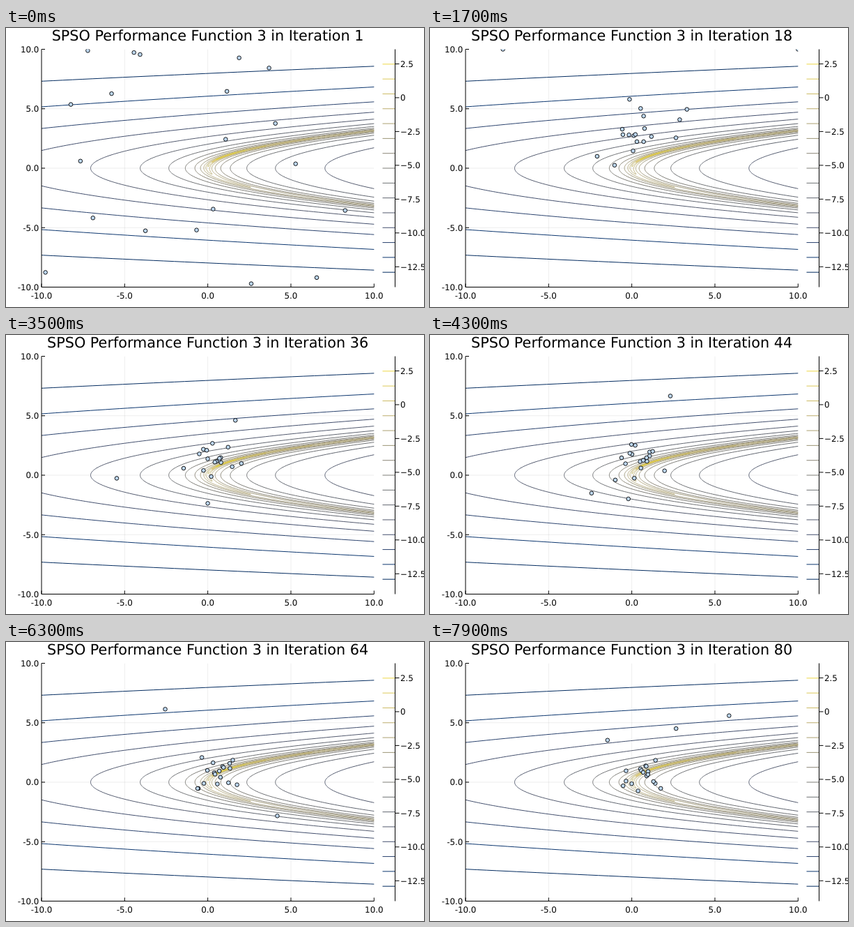
These frames come from a looping animation (600 by 400 pixels, 8000 ms). An HTML page:

```html
<!DOCTYPE html>
<html lang="en">
<head>
<meta charset="utf-8">
<title>Swarm performance</title>
<style>
  html, body { margin: 0; width: 100%; height: 100%; overflow: hidden; background: #fff; }
  svg { display: block; width: 600px; height: 400px; }
  text { font: 11.85px "DejaVu Sans", sans-serif; text-rendering: geometricPrecision; }
  #title { font-size: 20.75px; text-anchor: middle; }
  path { fill: none; stroke-width: 1; }
  .grid { stroke: #000; stroke-opacity: .07; }
  .axis { stroke: #000; }
  .dot { fill: #bdd7f1; stroke: #000; stroke-width: .9; }
</style>
</head>
<body>
<svg viewBox="0 0 600 400">
  <defs><clipPath id="area"><rect x="51" y="30.5" width="477.3" height="341"/></clipPath></defs>
  <g id="field" clip-path="url(#area)"></g>
  <g id="dots" clip-path="url(#area)"></g>
  <g id="axes"></g>
  <text id="title" x="289.6" y="18"></text>
</svg>
<script>
const LEFT = 51, RIGHT = 528.3, TOP = 30.5, BOTTOM = 371.5, BAR = 558.5;
const STEP_MS = 100, STEPS = 80, COUNT = 20;
const LEVELS = 15, LOW = -14.006, HIGH = 3.58;

const mix = (a, b, u) => a + (b - a) * u;
const clamp = v => Math.max(-10, Math.min(10, v));
const px = x => mix(LEFT, RIGHT, (x + 10) / 20);
const py = y => mix(BOTTOM, TOP, (y + 10) / 20);
const barY = v => mix(BOTTOM, TOP, (v - LOW) / (HIGH - LOW));
const layer = id => document.getElementById(id);

function add(parent, tag, attrs, text = "") {
  const el = document.createElementNS("http://www.w3.org/2000/svg", tag);
  for (const key in attrs) el.setAttribute(key, attrs[key]);
  el.textContent = text;
  return parent.appendChild(el);
}

// Colour ramp from navy over grey to yellow.
const RAMP = ["00204c", "05336e", "3b496c", "575d6d", "707173",
              "8a8678", "a59c74", "c3b369", "e1cc55", "fee838"]
  .map(h => [0, 2, 4].map(n => parseInt(h.slice(n, n + 2), 16)));

function colour(v) {
  const t = (v - LOW) / (HIGH - LOW) * (RAMP.length - 1);
  const n = Math.min(Math.floor(t), RAMP.length - 2);
  return `rgb(${RAMP[n].map((c, k) => Math.round(mix(c, RAMP[n + 1][k], t - n)))})`;
}

// Level set of -log(100 (x - y^2)^2 + (1 - y)^2): a circle of radius r
// in the coordinates 10 (x - y^2) and y - 1, kept to the visible rows.
function contour(v) {
  const r = Math.exp(-v / 2), samples = 500;
  const from = Math.asin(Math.max(-1, -11 / r));
  const to = Math.asin(Math.min(1, 9 / r));
  const points = [];
  for (const side of [1, -1]) {
    for (let k = 0; k <= samples; k++) {
      const u = k / samples;
      const angle = side > 0 ? mix(from, to, u) : mix(to, from, u);
      const y = 1 + r * Math.sin(angle);
      const x = y * y + side * r * Math.cos(angle) / 10;
      points.push(px(x).toFixed(2) + " " + py(y).toFixed(2));
    }
  }
  return "M" + points.join("L") + "Z";
}

function drawField() {
  const field = layer("field");
  for (const v of [-5, 0, 5]) {
    add(field, "path", { class: "grid", d: `M${px(v)} ${TOP}V${BOTTOM}M${LEFT} ${py(v)}H${RIGHT}` });
  }
  for (let k = 1; k <= LEVELS; k++) {
    const v = mix(LOW, HIGH, k / (LEVELS + 1));
    const stroke = colour(v);
    add(field, "path", { stroke, d: contour(v) });
    add(layer("axes"), "path", { stroke, d: `M540.5 ${barY(v)}H${BAR}` });
  }
}

function drawAxes() {
  const axes = layer("axes");
  let d = `M${LEFT} ${TOP}V${BOTTOM}H${RIGHT}M${BAR} ${TOP}V${BOTTOM}`;
  for (let v = -10; v <= 10; v += 5) {
    const label = v.toFixed(1);
    d += `M${px(v)} ${BOTTOM}v-5M${LEFT} ${py(v)}h5`;
    add(axes, "text", { x: px(v), y: 388, "text-anchor": "middle" }, label);
    add(axes, "text", { x: 47.3, y: py(v) + 4.3, "text-anchor": "end" }, label);
  }
  for (let v = 2.5; v >= -12.5; v -= 2.5) {
    d += `M${BAR} ${barY(v)}h6`;
    const label = v ? v.toFixed(1).replace("-", "\u2212") : "0";
    add(axes, "text", { x: 566, y: barY(v) + 4.3 }, label);
  }
  add(axes, "path", { d, class: "axis" });
}

function random(seed) {
  let s = seed;
  return () => {
    s = s + 0x6d2b79f5 | 0;
    let t = Math.imul(s ^ s >>> 15, s | 1);
    t ^= t + Math.imul(t ^ t >>> 7, t | 61);
    return ((t ^ t >>> 14) >>> 0) / 4294967296;
  };
}

// Each particle starts anywhere, then swings around the optimum:
// most stay close, a few reach far.
const rand = random(7);
const swarm = Array.from({ length: COUNT }, () => ({
  x: mix(-10, 10, rand()),
  y: mix(-10, 10, rand()),
  reach: -Math.log(1 - rand()) * 0.8,
  phase: rand() * 2 * Math.PI,
  speedX: mix(0.5, 1.3, rand()),
  speedY: mix(0.5, 1.3, rand())
}));

function place(p, step) {
  const joined = Math.min(1, step / 15);
  const reach = p.reach * (1.7 + 6 * Math.exp(-step / 14));
  const x = 0.7 + reach * Math.sin(p.phase + p.speedX * step);
  const y = 0.7 + 3 * Math.exp(-step / 25) + reach * Math.cos(p.phase + p.speedY * step);
  return [clamp(mix(p.x, x, joined)), clamp(mix(p.y, y, joined))];
}

drawField();
drawAxes();
const dots = swarm.map(() => add(layer("dots"), "circle", { r: 2.8, class: "dot" }));

let shown = -1;
function show(step) {
  if (step === shown) return;
  shown = step;
  layer("title").textContent = `SPSO Performance Function 3 in Iteration ${step + 1}`;
  swarm.forEach((p, n) => {
    const [x, y] = place(p, step);
    dots[n].setAttribute("cx", px(x));
    dots[n].setAttribute("cy", py(y));
  });
}

let start = null;
function tick(now) {
  if (start === null) start = now;
  show(Math.floor(Math.max(0, now - start) / STEP_MS) % STEPS);
  requestAnimationFrame(tick);
}
show(0);
requestAnimationFrame(tick);
</script>
</body>
</html>
```
